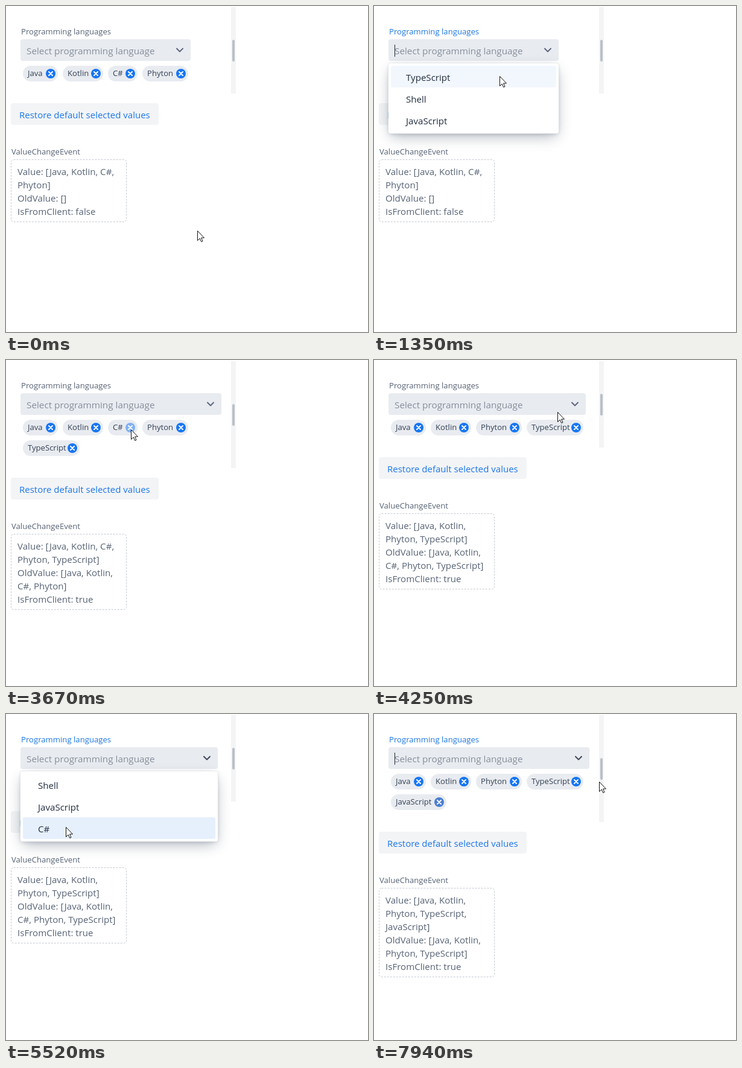
These frames come from a looping animation (600x540 px, 8000 ms). An HTML page:

```html
<!DOCTYPE html>
<html lang="en">
<head>
<meta charset="utf-8">
<title>Multi-select combo box</title>
<style>
  html, body { margin: 0; width: 100%; height: 100%; overflow: hidden; background: #fff; }
  svg { display: block; width: 600px; height: 540px; }
  text { font: 15.1px "Open Sans", "Noto Sans", sans-serif; fill: #566274; white-space: pre; }
  .small { font-size: 13.15px; }
  .chip text { font-size: 13.1px; fill: #344054; }
  .chip rect { fill: #e8ebf0; }
  .chip circle { fill: #1676f3; }
  .chip path { stroke: #fff; stroke-width: 2; stroke-linecap: round; }
  .placeholder { font-size: 15.3px; fill: #868e9b; }
  .button { font-size: 15px; fill: #1a76e6; }
  .item { fill: #212d3f; }
  .dashed { fill: none; stroke: #c4c9d1; stroke-dasharray: 3 2; }
  .near { fill: #192b42; opacity: .2; filter: blur(3px); }
  .far { fill: #192b42; opacity: .36; filter: blur(12px); }
</style>
</head>
<body>
<svg viewBox="0 0 600 540">
  <text id="label" class="small" x="25" y="47">Programming languages</text>
  <rect id="field" x="24" y="55" height="36" rx="4"/>
  <text class="placeholder" x="34" y="80">Select programming language</text>
  <rect id="caret" x="34" y="64" width="1" height="20" fill="#1c2635"/>
  <path id="chevron" d="M-5 70.5l5 5 5-5" fill="none" stroke-width="2" stroke-linecap="round" stroke-linejoin="round"/>
  <g id="scenes"></g>
  <g id="overlays"></g>
  <path id="cursor" d="M.5.5V16.5L4.2 13l2.5 5.5 2.3-1L6.6 12h4.9z" fill="#fff" stroke="#111" stroke-linejoin="round"/>
</svg>
<script>
const LOOP = 8000;
const $ = id => document.getElementById(id);
const chipWidths = { Java: 58, Kotlin: 67, "C#": 49, Phyton: 76, TypeScript: 94, JavaScript: 92 };

const scenes = [
  { from: 0, width: 282, rows: [["Java", "Kotlin", "C#", "Phyton"]],
    lines: ["Value: [Java, Kotlin, C#,", "Phyton]", "OldValue: []", "IsFromClient: false"] },
  { from: 2140, width: 333, rows: [["Java", "Kotlin", "C#", "Phyton"], ["TypeScript"]],
    lines: ["Value: [Java, Kotlin, C#,", "Phyton, TypeScript]", "OldValue: [Java, Kotlin,", "C#, Phyton]", "IsFromClient: true"] },
  { from: 3790, width: 327, rows: [["Java", "Kotlin", "Phyton", "TypeScript"]],
    lines: ["Value: [Java, Kotlin,", "Phyton, TypeScript]", "OldValue: [Java, Kotlin,", "C#, Phyton, TypeScript]", "IsFromClient: true"] },
  { from: 6490, width: 333, rows: [["Java", "Kotlin", "Phyton", "TypeScript"], ["JavaScript"]],
    lines: ["Value: [Java, Kotlin,", "Phyton, TypeScript,", "JavaScript]", "OldValue: [Java, Kotlin,", "Phyton, TypeScript]", "IsFromClient: true"] }
];

const overlays = [
  { open: 1080, pick: 2140, close: 2230, width: 282, items: ["TypeScript", "Shell", "JavaScript"] },
  { open: 4830, pick: 6490, close: 6590, width: 327, items: ["Shell", "JavaScript", "C#"] }
];

const rect = (x, y, w, h, rx, attrs) =>
  `<rect x="${x}" y="${y}" width="${w}" height="${h}" rx="${rx}" ${attrs}/>`;
const text = (x, y, content, cls = "") => `<text class="${cls}" x="${x}" y="${y}">${content}</text>`;

function chipRow(names, row) {
  let x = 28;
  const y = 99 + row * 34;
  return names.map(name => {
    const w = chipWidths[name], cx = x + w - 12, cy = y + 13;
    const chip = `<g class="chip" data-name="${name}">${rect(x, y, w, 26, 13, "")}${text(x + 8, y + 17, name)}
      <circle cx="${cx}" cy="${cy}" r="8"/><path d="M${cx - 3} ${cy - 3}l6 6m0-6l-6 6"/></g>`;
    x += w + 8;
    return chip;
  }).join("");
}

function sceneMarkup({ rows, lines }) {
  const shift = (rows.length - 1) * 34;
  return `<g>
    ${rect(373, 2, 8, 143 + shift, 0, 'fill="#f3f4f5"')}
    ${rect(375, 56 + shift / 2, 4, 36, 2, 'fill="#b9c0c8"')}
    ${rows.map(chipRow).join("")}
    <g transform="translate(0 ${shift})">
      ${rect(8, 161, 245, 36, 4, 'fill="#f3f4f6"')}
      ${text(22, 186, "Restore default selected values", "button")}
      ${text(9, 246, "ValueChangeEvent", "small")}
      ${rect(8.5, 254.5, 191, lines.length * 22 + 15, 4, 'class="dashed"')}
      ${lines.map((line, i) => text(19, 280 + i * 22, line)).join("")}
    </g></g>`;
}

function overlayMarkup({ width, items }) {
  const panel = h => rect(28, 107, width - 8, Math.max(h - 8, 0), 4, 'class="far"') +
    rect(25, 98, width - 2, h - 2, 4, 'class="near"') +
    rect(23.5, 94.5, width + 1, h + 1, 4, 'fill="#fff" stroke="#192b42" stroke-opacity=".07"');
  return `<g><g>${panel(116)}
      <g>${rect(28, 99, width - 8, 36, 3, 'fill="#e6f0fd"')}
      ${items.map((item, i) => text(53, 124 + i * 36, item, "item")).join("")}</g></g>
    <g>${panel(8)}</g></g>`;
}

$("scenes").innerHTML = scenes.map(sceneMarkup).join("");
$("overlays").innerHTML = overlays.map(overlayMarkup).join("");

const clamp = v => Math.min(1, Math.max(0, v));
const ramp = (t, start, end) => clamp((t - start) / (end - start));
const smooth = p => p * p * (3 - 2 * p);
const mix = (a, b, p) => a.map((v, i) => v + (b[i] - v) * p);
const rgb = c => `rgb(${c.map(Math.round)})`;
const show = (el, on) => el.setAttribute("visibility", on ? "inherit" : "hidden");

// Keys are [time, ...values].
function track(keys, t, ease = p => p) {
  const i = keys.findIndex(key => key[0] > t);
  if (i === 0) return keys[0].slice(1);
  if (i < 0) return keys.at(-1).slice(1);
  const a = keys[i - 1], b = keys[i];
  return mix(a.slice(1), b.slice(1), ease(ramp(t, a[0], b[0])));
}

const pointer = [
  [60, 317, 372], [780, 290, 76], [1120, 290, 76], [1340, 208, 116], [1420, 208, 116], [1680, 208, 124],
  [3040, 208, 124], [3330, 207, 115], [3900, 207, 115], [4370, 323, 80], [4960, 323, 80],
  [5460, 99, 187], [5520, 99, 187], [5760, 101, 200], [6290, 119, 155], [7190, 119, 155],
  [7480, 113, 249], [7930, 373, 112]
];
const idle = [88, 99, 117], hovered = [60, 72, 92], focused = [28, 119, 224];
const labelColor = [
  [520, ...idle], [700, ...hovered], [960, ...hovered], [1140, ...focused], [3580, ...focused],
  [3650, ...idle], [4250, ...idle], [4370, ...hovered], [4830, ...hovered], [5000, ...focused]
];
const fieldHover = [[520, 0], [700, 1], [980, 1], [1150, 0], [4250, 0], [4370, 1], [4880, 1], [4990, 0]];
const focusStarts = [[1010, 2080], [2080, 3580], [4770, 6370], [6370, LOOP]];

function caretVisible(t) {
  const span = focusStarts.find(([from, to]) => t >= from && t < to);
  return !!span && Math.floor((t - span[0]) / 530) % 2 === 0;
}

function renderOverlay(overlay, group, t, y) {
  const { open, pick, close } = overlay;
  const [full, strip] = group.children;
  const content = full.lastElementChild, highlight = content.firstElementChild;
  group.setAttribute("opacity", ramp(t, open, open + 73) * (1 - ramp(t, close, close + 80)));
  show(full, t < pick);
  show(strip, t >= pick);
  show(content, t >= open + 100);
  const row = Math.floor((y - 99) / 36);
  const firstFade = overlay === overlays[0] ? ramp(t, 1260, 1440) : 1;
  highlight.setAttribute("y", 99 + row * 36);
  highlight.setAttribute("opacity", row >= 0 && row < 3 ? firstFade : 0);
}

function render(t) {
  const current = scenes.findLastIndex(scene => t >= scene.from);
  const { width } = scenes[current];
  const [x, y] = track(pointer, t, smooth);
  const hover = track(fieldHover, t)[0];

  [...$("scenes").children].forEach((group, i) => show(group, i === current));
  overlays.forEach((overlay, i) => renderOverlay(overlay, $("overlays").children[i], t, y));

  $("label").style.fill = rgb(track(labelColor, t));
  $("field").setAttribute("width", width);
  $("field").style.fill = rgb(mix([232, 235, 240], [222, 225, 232], hover));
  $("chevron").setAttribute("transform", `translate(${width + 6} 0)`);
  $("chevron").style.stroke = rgb(mix([95, 101, 125], [62, 70, 86], ramp(t, 4400, 4490)));
  show($("caret"), caretVisible(t));
  $("cursor").setAttribute("transform", `translate(${Math.round(x)} ${Math.round(y)})`);

  const removing = $("scenes").children[1].querySelector('[data-name="C#"] circle');
  removing.style.fill = rgb(mix([22, 118, 243], [128, 177, 244], ramp(t, 3560, 3640)));
  const last = $("scenes").children[3].querySelector('[data-name="JavaScript"] circle');
  last.style.fill = t < 7280 ? "#1676f3" : "#4a7fd0";
}

function tick(now) {
  render(now % LOOP);
  requestAnimationFrame(tick);
}
render(0);
requestAnimationFrame(tick);
</script>
</body>
</html>
```
